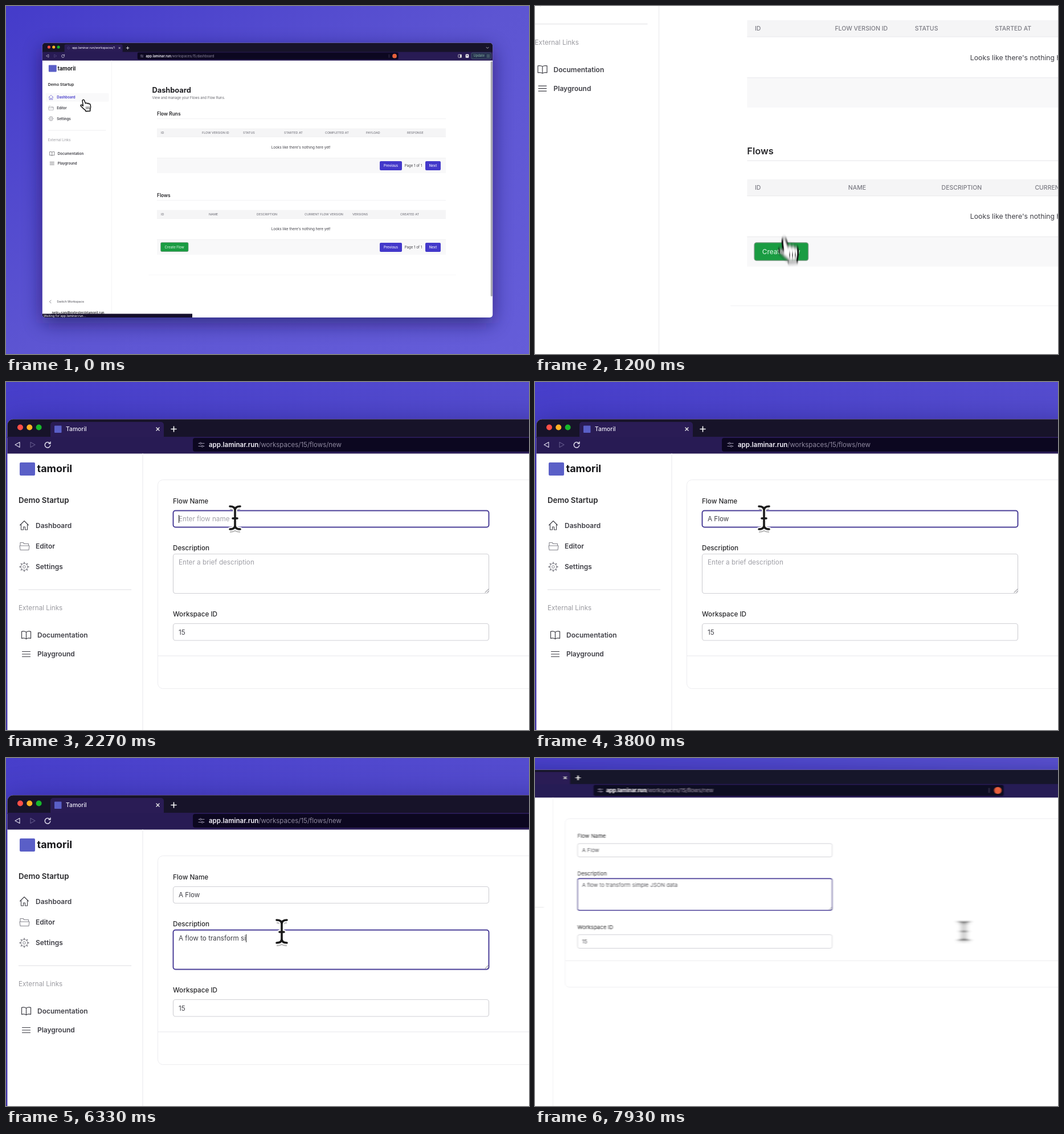
An HTML page that plays this animation: 918x610 px, repeating every 8000 ms.

```html
<!DOCTYPE html>
<html lang="en">
<head>
<meta charset="utf-8">
<title>Create a flow</title>
<style>
html, body { margin: 0; width: 100%; height: 100%; overflow: hidden; background: #4a40c6; }
svg { display: block; width: 918px; height: 610px; }
text { font-family: Inter, "Open Sans", sans-serif; white-space: pre; }
</style>
</head>
<body>
<svg id="stage" viewBox="0 0 918 610"></svg>
<script>
const LOOP = 8000, ZOOM = 1.95;
const INK = '#3f3f46', MUTED = '#9b9ba1', LINE = '#e8e8eb', INDIGO = '#4338ca', LOGO = '#5a5fc7';

const rect = (x, y, w, h, fill, rx = 0, extra = '') =>
  `<rect x="${x}" y="${y}" width="${w}" height="${h}" fill="${fill}" rx="${rx}" ${extra}/>`;
const box = (x, y, w, h, id = '') =>
  rect(x, y, w, h, '#fff', 4, `id="${id}" stroke="#d0d0d5" stroke-width="1.2"`);
const stroke = (d, color = INK, width = 1.2) =>
  `<path d="${d}" fill="none" stroke="${color}" stroke-width="${width}" stroke-linecap="round" stroke-linejoin="round"/>`;
// y is the vertical middle of the line of text
const label = (x, y, s, size, weight = 400, color = INK, extra = '') =>
  `<text x="${x}" y="${y + size * .36}" font-size="${size}" font-weight="${weight}" fill="${color}" ${extra}>${s}</text>`;
const group = (id, body, extra = '') => `<g id="${id}" ${extra}>${body}</g>`;
const middle = 'text-anchor="middle"';

function chrome() {
  const lights = ['#ff4f47', '#ffb224', '#17b82b']
    .map((c, i) => `<circle cx="${25 + i * 16.3}" cy="79.5" r="5" fill="${c}"/>`).join('');
  return rect(0, 60, 1550, 38, '#171329') + lights +
    rect(78, 70, 199, 30, '#2a1c55', 5) + rect(0, 96, 1550, 29.5, '#281b54') +
    group('oldTab', '<circle cx="92" cy="82.5" r="3.5" fill="none" stroke="#5a5396" stroke-width="1.2"/>' +
      `<g clip-path="url(#tabClip)">${label(104, 82.5, 'app.laminar.run/workspaces/15', 10.2, 500, '#eceaf6')}</g>`) +
    group('newTab', rect(85, 76.5, 12.5, 12.5, LOGO, 1) + label(105, 82.5, 'Tamoril', 10.4, 500, '#eceaf6')) +
    stroke('M264 80l5 5m0-5l-5 5', '#eee', 1.4) + stroke('M290 82.5h9m-4.500-4.500v9', '#fff', 1.6) +
    stroke('M24 105.500v9l-8-4.500z', '#d6d2e6') + stroke('M43 105.500v9l8-4.500z', '#5d5386') +
    stroke('M77 107.500a4.800 4.800 0 1 0 .8 3.500m.2-6v3h-3', '#e3e0ef', 1.5) +
    rect(328, 98, 893, 24, '#0c0720', 4) +
    stroke('M338 107.500h2m3 0h5m-10 5h5m3 0h2', '#9a94ad') +
    '<circle cx="341.500" cy="107.500" r="1.500" fill="none" stroke="#9a94ad"/><circle cx="344.500" cy="112.500" r="1.500" fill="none" stroke="#9a94ad"/>' +
    `<text x="356" y="114.200" font-size="11.500" font-weight="600" fill="#f4f2fa">app.laminar.run<tspan id="path" font-weight="400" fill="#8f899f"></tspan></text>` +
    stroke('M1189 105v10', '#59516f') + '<circle cx="1208" cy="110" r="7.500" fill="#e8613c"/>' +
    stroke('M1522 80l4 4 4-4', '#ddd', 1.5) +
    rect(1426, 105, 11, 10, 'none', 1, 'stroke="#ddd" stroke-width="1.500"') + rect(1432, 105, 5, 10, '#ddd') +
    rect(1451, 104, 11, 12, '#eee', 2) + '<circle cx="1456.500" cy="108.500" r="2" fill="#281b54"/>' +
    rect(1471, 99, 68, 21, '#26304f', 4, 'stroke="#5f7d86" stroke-width="1"') +
    label(1478, 109.5, 'Update', 11, 500, '#7fa99a') + stroke('M1524 106h9m-9 4h9m-9 4h9', '#7fa99a');
}

function sidebar() {
  const nav = (y, s) => label(52, y, s, 12, 600);
  const gear = Array.from({ length: 8 }, (_, i) => {
    const a = i * Math.PI / 4, c = Math.cos(a), s = Math.sin(a);
    return `M${32 + 6 * c} ${324 + 6 * s}L${32 + 7.8 * c} ${324 + 7.8 * s}`;
  }).join('');
  return rect(239.5, 125, 1, 880, LINE) +
    rect(24, 141, 27, 23, LOGO, 2) + label(54.5, 152, 'tamoril', 18, 700, '#18181b') +
    label(22, 207, 'Demo Startup', 13.3, 600, '#27272a') +
    group('active', rect(14, 237, 216, 29, '#f9f9fa', 3)) +
    group('home', stroke('M24.500 251l7.500-7.500 7.500 7.500m-13-1.500v9.500h4v-5h3v5h4v-9.500', 'currentColor', 1.1) +
      label(52, 251.5, 'Dashboard', 12, 600, 'currentColor')) +
    stroke('M25 287v-5.500h5l2 2h7.500v3.500m-15.500 0h17l-1 7.500h-15z', '#85858d', 1.1) + nav(287.7, 'Editor') +
    stroke(gear, '#85858d', 1.8) + '<circle cx="32" cy="324" r="6" fill="none" stroke="#85858d"/><circle cx="32" cy="324" r="2.300" fill="none" stroke="#85858d"/>' +
    nav(324, 'Settings') + rect(22, 363.5, 198, 1, '#dedee2') +
    label(22, 396, 'External Links', 11.7, 400, MUTED) +
    stroke('M35.500 438.500c-2-1.600-5-1.800-8-1.200v12c3-.6 6-.4 8 1.200c2-1.600 5-1.800 8-1.200v-12c-3-.6-6-.4-8 1.200v12') +
    label(55, 443.8, 'Documentation', 12, 600) +
    stroke('M28.500 472.500h14m-14 4.500h14m-14 4.500h14') + label(55, 477, 'Playground', 12, 600) +
    stroke('M32 944.500l-5 5 5 5') + label(52, 949, 'Switch Workspace', 10.5, 500, '#63636a') +
    label(35, 987, 'nelo+sandboxtester@tamoril.run', 11.2, 600, '#27272a');
}

function table(y, title, heads) {
  const button = (x, w, s) => rect(x, y + 83, w, 16, INDIGO, 2) + label(x + w / 2, y + 91, s, 6, 500, '#f2f1ff', middle);
  return label(265, y, title, 8.4, 600, '#27272a') + rect(265, y + 8.5, 507, .6, LINE) +
    rect(265, y + 25.5, 507, 15, '#f5f5f6') + rect(265, y + 40.2, 507, .5, LINE) +
    heads.map(([x, s]) => label(x, y + 33, s, 5.4, 500, '#7b7b83')).join('') +
    label(517.7, y + 59, "Looks like there's nothing here yet!", 6.3, 400, INK, middle) +
    rect(265, y + 77, 507, 27, '#f8f8f9') + rect(265, y + 77, 507, .5, LINE) +
    button(656, 39, 'Previous') + label(715, y + 91, 'Page 1 of 1', 6.1, 400, INK, middle) + button(736, 27, 'Next');
}

function dashboard() {
  return label(256.5, 147.5, 'Dashboard', 12.8, 700, '#1f1f23') +
    label(256.5, 161, 'View and manage your Flows and Flow Runs.', 6, 400, '#66666d') +
    table(189, 'Flow Runs', [[272, 'ID'], [344, 'FLOW VERSION ID'], [416, 'STATUS'], [488, 'STARTED AT'],
      [560, 'COMPLETED AT'], [632, 'PAYLOAD'], [704, 'RESPONSE']]) +
    table(332, 'Flows', [[272, 'ID'], [356, 'NAME'], [440, 'DESCRIPTION'], [524, 'CURRENT FLOW VERSION'],
      [608, 'VERSIONS'], [692, 'CREATED AT']]) +
    rect(271.5, 414.5, 48.5, 16, '#1a9c42', 2, 'stroke="#7d9a86" stroke-width=".7"') +
    label(295.7, 422.5, 'Create Flow', 6, 500, '#c9ecd4', middle) +
    rect(250, 471, 540, .5, '#f1f1f3') +
    rect(850.8, 97, 3, 412, '#a3a3aa', 1.5);
}

function form() {
  const heading = (y, s) => label(293, y, s, 11.7, 500, '#27272a');
  return rect(266.5, 171.5, 1240, 366, '#fff', 9, 'stroke="#ececef"') + rect(267, 479.5, 1239, 1, LINE) +
    heading(208.5, 'Flow Name') + box(293.5, 225.5, 554, 29, 'nameBox') +
    heading(291, 'Description') + box(293.5, 301.5, 554, 69, 'noteBox') +
    stroke('M841 369l6-6m-2.500 6l2.500-2.500', '#77777e', 1) +
    heading(407, 'Workspace ID') + box(293.5, 423.5, 554, 29.5) + label(303, 438.3, '15', 11.7) +
    label(303, 240, '', 11.7, 400, INK, 'id="nameText"') +
    label(303, 316, '', 11.7, 400, INK, 'id="noteText"') +
    rect(303, 0, 1, 14, '#222', 0, 'id="caret"');
}

function pointers() {
  const beam = 'M-9-20C-3-20 0-18 0-13V13C0 18-3 20-9 20M9-20C3-20 0-18 0-13M0 13C0 18 3 20 9 20M-4 1H4';
  const hand = 'M-1.800 1.500C-1-.500 1-.300 1.600 1.300L3.600 6.600C4.300 5.400 6.400 5.600 6.900 7C7.700 6 9.400 6.400 9.700 7.700' +
    'C10.500 7 12 7.600 12.200 9C12.800 12 13 14.500 11.800 16.500V20L4 20.500L3.600 18.800C0 16-2.500 13.500-4.600 11.200' +
    'C-5.600 9.400-3.600 8.600-2.200 9.800L-.600 11.200Z';
  return group('beam', `<path d="${beam}" fill="none" stroke="#0004" stroke-width="8" transform="translate(0 2)"/>` +
      stroke(beam, '#fff', 7.5) + stroke(beam, '#1a1a1a', 3.6)) +
    group('hand', `<path d="${hand}" fill="#0003" transform="translate(.500 1.500)"/>` +
      `<path d="${hand}" fill="#fff" stroke="#111" stroke-width="1.500" stroke-linejoin="round"/>` +
      stroke('M5 12.500v4m2.500-4v4m2.500-4v4', '#222', .9), `transform="scale(${ZOOM})"`);
}

const detail = `transform="scale(${1 / ZOOM}) translate(122 61)"`;
const win = 'x="63.800" y="64.800" width="790.400" height="481.200" rx="5"';
const $ = id => document.getElementById(id);

$('stage').innerHTML = `<defs>
  <linearGradient id="sky" x1="0" y1="0" x2="1" y2="1">
    <stop offset="0" stop-color="#4037c8"/><stop offset=".5" stop-color="#5d55d2"/><stop offset="1" stop-color="#665eda"/>
  </linearGradient>
  <clipPath id="winClip"><rect ${win}/></clipPath>
  <clipPath id="tabClip"><rect x="104" y="70" width="146" height="26"/></clipPath>
  <filter id="shade" x="-20%" y="-20%" width="140%" height="150%"><feGaussianBlur stdDeviation="17"/></filter>
  <filter id="camBlur" filterUnits="userSpaceOnUse" x="-20" y="-20" width="958" height="650"><feGaussianBlur id="camDev"/></filter>
  <filter id="ptrBlur" filterUnits="userSpaceOnUse" x="-80" y="-80" width="160" height="160"><feGaussianBlur id="ptrDev"/></filter>
</defs>` + group('lens', group('camera',
  rect(-60, -60, 1038, 730, 'url(#sky)') +
  `<rect ${win} fill="#120a4a" opacity=".6" filter="url(#shade)" transform="translate(0 10)"/>` +
  `<g clip-path="url(#winClip)">` + rect(60, 60, 800, 490, '#fff') +
  `<g ${detail}>${chrome()}${sidebar()}</g>` + group('dash', dashboard()) +
  group('form', form(), detail) +
  group('status', rect(63, 539.5, 264, 8, '#150f2b') + label(66, 543, 'Waiting for app.laminar.run...', 5.4, 500, '#e6e4f0')) +
  `</g><g ${detail}>` + group('pointer', group('pointerBody', pointers())) + '</g>'));

// time, zoom, x, y
const CAMERA = [[235, 1, 0, 0], [1135, 1.95, -145, -402], [1832, 1.95, -122, -61],
  [7300, 1.95, -122, -61], [8300, 1.405, -322, -90]];
// time, x, y
const POINTER = [[130, 143, 259], [730, 481, 795], [900, 463, 770], [1130, 463, 770], [1640, 401, 214],
  [2000, 402, 238], [4250, 402, 238], [4650, 484, 304], [7250, 484, 304], [8350, 1447, 469]];
const PAGE_SWAP = 1220, NOTE_FOCUS = 4650;
const NAME = { text: 'A Flow', hint: 'Enter flow name', start: 2750, step: 90, focus: PAGE_SWAP };
const NOTE = { text: 'A flow to transform simple JSON data', hint: 'Enter a brief description', start: 4850, step: 68, focus: NOTE_FOCUS };

function sample(keys, t) {
  const i = keys.findIndex(k => k[0] > t);
  if (i === 0) return keys[0].slice(1);
  const a = keys[i - 1], b = keys[i], s = (t - a[0]) / (b[0] - a[0]), e = s * s * (3 - 2 * s);
  return a.slice(1).map((v, j) => v + (b[j + 1] - v) * e);
}

const show = (id, on) => $(id).setAttribute('display', on ? 'inline' : 'none');

function smear(target, filter, dev, dx, dy) {
  if (Math.hypot(dx, dy) < .15) return $(target).removeAttribute('filter');
  $(dev).setAttribute('stdDeviation', `${Math.abs(dx).toFixed(2)} ${Math.abs(dy).toFixed(2)}`);
  $(target).setAttribute('filter', `url(#${filter})`);
}

const typed = (field, t) =>
  Math.max(0, Math.min(field.text.length, Math.floor((t - field.start) / field.step) + 1));

function fill(id, field, t) {
  const n = typed(field, t);
  $(id).textContent = n ? field.text.slice(0, n) : field.hint;
  $(id).setAttribute('fill', n ? INK : '#a0a0a7');
}

function focusRing(id, on) {
  $(id).setAttribute('stroke', on ? '#4b3f98' : '#d0d0d5');
  $(id).setAttribute('stroke-width', on ? 2 : 1.2);
}

function placeCaret(t) {
  const inNote = t >= NOTE_FOCUS, field = inNote ? NOTE : NAME, n = typed(field, t);
  const lastKey = n ? field.start + (n - 1) * field.step : field.focus;
  const width = n ? $(inNote ? 'noteText' : 'nameText').getComputedTextLength() : 0;
  $('caret').setAttribute('x', 303 + width);
  $('caret').setAttribute('y', inNote ? 309 : 233);
  show('caret', (t - lastKey) % 1000 < 500);
}

function render(t) {
  const [k, x, y] = sample(CAMERA, t), [k0, x0, y0] = sample(CAMERA, t - 16);
  $('camera').setAttribute('transform', `translate(${x} ${y}) scale(${k})`);
  const drift = (half, p, p0) => Math.min(1, Math.abs((half - p) / k * k0 + p0 - half) * .12);
  smear('lens', 'camBlur', 'camDev', drift(459, x, x0), drift(305, y, y0));

  const [px, py] = sample(POINTER, t), [qx, qy] = sample(POINTER, t - 16);
  $('pointer').setAttribute('transform', `translate(${px} ${py})`);
  smear('pointerBody', 'ptrBlur', 'ptrDev', (px - qx) * .3, (py - qy) * .3);
  show('hand', t < 1400);
  show('beam', t >= 1400);

  const onForm = t >= PAGE_SWAP;
  for (const id of ['dash', 'oldTab', 'active']) show(id, !onForm);
  for (const id of ['form', 'newTab']) show(id, onForm);
  show('status', t < 400);
  $('home').setAttribute('color', onForm ? INK : INDIGO);
  $('path').textContent = '/workspaces/15/' + (onForm ? 'flows/new' : 'dashboard');
  if (!onForm) return;
  fill('nameText', NAME, t);
  fill('noteText', NOTE, t);
  focusRing('nameBox', t < NOTE_FOCUS);
  focusRing('noteBox', t >= NOTE_FOCUS);
  placeCaret(t);
}

const begin = performance.now();
function tick() {
  render((performance.now() - begin) % LOOP);
  requestAnimationFrame(tick);
}
tick();
</script>
</body>
</html>
```
